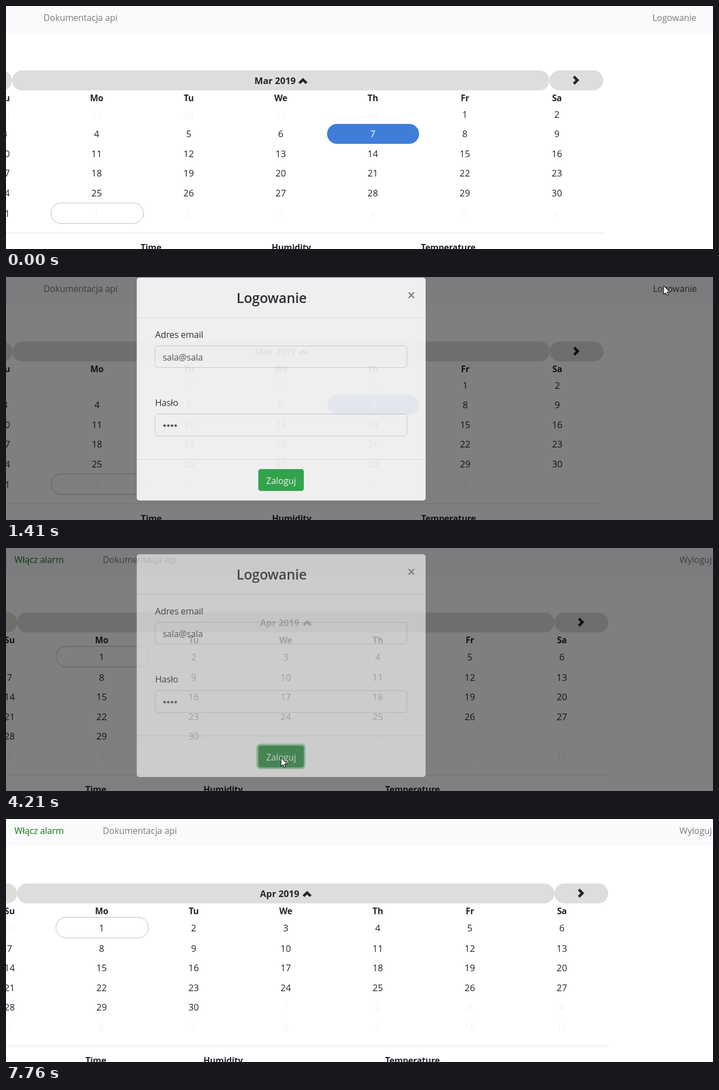
An HTML page that plays this animation: 1275 by 439 pixels, repeating every 8370 ms.

```html
<!DOCTYPE html>
<html lang="pl">
<head>
<meta charset="utf-8">
<title>Kalendarz</title>
<style>
  html, body { margin: 0; width: 100%; height: 100%; overflow: hidden; background: #fff; }
  svg { display: block; }
  text { font: 16px "Open Sans", "Noto Sans", sans-serif; letter-spacing: -.1px; fill: #212529; }
  .mid { text-anchor: middle; }
  .end { text-anchor: end; }
  .day { font-size: 16.5px; letter-spacing: 0; }
  .off { fill: #f4f4f4; }
  .head { font-weight: 700; font-size: 15.6px; letter-spacing: -.2px; }
  .month { font-weight: 700; font-size: 16.4px; letter-spacing: 0; }
  .link { fill: #000; fill-opacity: .5; }
  .title { font-weight: 600; font-size: 24.6px; }
  .value { fill: #495057; }
  .white { fill: #fff; }
  .pill { fill: #dddddc; }
  .icon { fill: none; stroke: #212529; stroke-width: 4.6; }
  .field { fill: #fff; stroke: #ced4da; }
  .rule { stroke: #dee2e6; }
</style>
</head>
<body>
<svg id="stage" width="1275" height="439" viewBox="0 0 1275 439"></svg>
<script>
const LOOP = 8370;
const LOGIN = 4130;
const PITCH = 166;

const label = (x, y, str, cls = '', id = '') =>
  `<text x="${x}" y="${y}" class="${cls}" id="${id}">${str}</text>`;
const box = (x, y, w, h, r, attrs) =>
  `<rect x="${x}" y="${y}" width="${w}" height="${h}" rx="${r}" ${attrs}/>`;

const march = {
  id: 'march', shift: 0, name: 'Mar 2019', nameX: 448, iconX: 535.5,
  rows: [196, 231, 267, 302, 338, 375],
  first: -4, before: 28, length: 31, today: [1, 5], selected: [4, 1],
  columns: [261.5, 514.5, 797.5]
};
const april = {
  id: 'april', shift: 9, name: 'Apr 2019', nameX: 458, iconX: 543,
  rows: [197, 234, 269, 305, 340, 376],
  first: 0, before: 31, length: 30, today: [1, 0],
  columns: [162, 391.5, 733]
};

function calendar(m) {
  const left = m.shift;
  const colX = c => left - 2.5 + c * PITCH;
  let out = box(left - 86, 116.5, 97, 36, 18, 'class="pill"')
    + box(left + 11, 116.5, 969, 36, 18, `class="pill" id="${m.id}Bar"`)
    + box(left + 980, 116.5, 97, 36, 18, 'class="pill"')
    + label(m.nameX, 140.5, m.name, 'month')
    + `<path class="icon" d="M${m.iconX - 6.5} 139.4l6.5-6.2l6.5 6.2"/>`
    + `<path class="icon" d="M${left + 1024} 127.5l6.5 6.5l-6.5 6.5"/>`
    + box(0, 0, PITCH, 36, 18, `fill="#f4f4f4" id="${m.id}Hover" visibility="hidden"`);
  const [tc, tr] = m.today;
  out += box(colX(tc) - 82.5, m.rows[tr] - 19.2, 167, 37, 18.5, 'fill="none" stroke="#bbb"');
  if (m.selected) {
    const [sc, sr] = m.selected;
    out += box(colX(sc) - 82.5, m.rows[sr] - 18, PITCH, 36, 18, 'fill="#3f7dd9"');
  }
  ['Su', 'Mo', 'Tu', 'We', 'Th', 'Fr', 'Sa'].forEach((d, c) => {
    out += label(colX(c), 172, d, 'head mid');
  });
  for (let i = 0; i < 42; i++) {
    const c = i % 7, r = Math.floor(i / 7), day = i + m.first;
    const inside = day > 0 && day <= m.length;
    const number = day < 1 ? day + m.before : inside ? day : day - m.length;
    const picked = m.selected && m.selected[0] === c && m.selected[1] === r;
    out += label(colX(c), m.rows[r] + 6, number, 'day mid ' + (picked ? 'white' : inside ? '' : 'off'));
  }
  out += box(0, 409.3, left + 1076.5, 1.3, 0, 'fill="#000" fill-opacity=".1"');
  ['Time', 'Humidity', 'Temperature'].forEach((h, i) => {
    out += label(m.columns[i], 442, h, 'head mid');
  });
  return out;
}

const modal = box(235.5, 21, 521.5, 403, 5, 'fill="#fff" stroke="#000" stroke-opacity=".2"')
  + label(479, 66.5, 'Logowanie', 'title mid')
  + '<path d="M726 48l10 10m0-10l-10 10" stroke="#808080" stroke-width="2.4"/>'
  + '<path class="rule" d="M236 93.5H757M236 349.5H757"/>'
  + label(269, 130, 'Adres email')
  + box(269, 144.5, 454, 39, 4.5, 'class="field"')
  + label(282.5, 171, 'sala@sala', 'value')
  + label(269, 253, 'Hasło')
  + box(269, 267.5, 454, 39.5, 4.5, 'class="field"')
  + [286, 292.7, 299.4, 306].map(x => `<circle cx="${x}" cy="288.5" r="2.3" fill="#495057"/>`).join('')
  + box(451.5, 363.5, 88.5, 46, 7, 'fill="#28a745" fill-opacity=".5" id="ring"')
  + box(455, 367, 82, 39.5, 4.5, 'id="button"')
  + label(496, 394, 'Zaloguj', 'white mid');

const bar = box(0, 0, 1275, 49.5, 0, 'fill="#f8fafc"');
document.getElementById('stage').innerHTML = `
  <g id="guest">${bar}
    ${label(67.5, 27, 'Dokumentacja api', 'link')}
    ${label(1245, 27, 'Logowanie', 'link end', 'loginLink')}
    <g id="marchBody">${calendar(march)}</g>
  </g>
  <g id="member">${bar}
    ${label(15, 27, 'Włącz alarm', '" style="fill:#1a751a')}
    ${label(174.5, 27, 'Dokumentacja api', 'link')}
    ${label(1273, 27, 'Wyloguj', 'link end')}
    ${calendar(april)}
  </g>
  <rect id="backdrop" width="1275" height="439"/>
  <g id="modal">${modal}</g>
  <g id="cursor" fill="#fff" stroke="#000" stroke-linejoin="round">
    <path id="arrow" d="M0 0V15.5L3.6 12.2L6 17.6L8.4 16.5L6 11.3H11Z"/>
    <path id="hand" d="M-1.6 11V1.6a1.6 1.6 0 0 1 3.2 0V7a1.5 1.4 0 0 1 2.9 .4a1.4 1.4 0 0 1 2.7 .6a1.3 1.3 0 0 1 2.3 .7V13q0 2-1.3 4V19.5H0V18L-4.6 12.5q-1.2-1.7 .2-2.4q1.2-.5 2.8 1.9z"/>
  </g>`;

// Cursor moves: start, end, number of steps, evenly timed points.
const moves = [
  [70, 450, 6, [1160, 410, 1172, 215, 1184, 85, 1188, 24, 1189, 8, 1190, 12.5]],
  [1410, 1800, 6, [1186, 16, 1180, 21, 1150, 40, 1070, 75, 950, 110, 821, 133]],
  [1880, 2650, 11, [740, 180, 650, 255, 580, 325, 530, 375, 509, 388]],
  [2880, 2960, 2, [514, 387, 520, 385]],
  [3590, 3660, 2, [518, 385, 517, 386]],
  [3830, 3980, 3, [508, 383, 500, 380, 496, 379]],
  [4540, 5370, 12, [475, 368, 410, 345, 335, 290, 250, 220, 180, 180, 135, 150,
    112, 142, 102, 135, 99, 133, 96, 114, 92, 95, 88, 76]],
  [5450, 6220, 11, [92, 62, 98, 30, 96, 16, 60, 34, 25, 36, 1, 42]],
  [6300, 7070, 11, [30, 36, 80, 34, 40, 40, 1, 44, 40, 46, 82, 48]],
  [7530, 7680, 3, [130, 75, 620, 230, 1100, 418]]
];
const shade = [[0, 0], [1180, .15], [1260, .4], [1330, .5], [4220, .3], [4300, 0]];
// Dialog: time, opacity, vertical offset.
const dialog = [[0, 0, -50], [1330, .38, -40], [1410, .88, -20], [1490, 1, -7],
  [1560, 1, -1.5], [1640, 1, 0], [LOGIN, .6, -10], [4220, 0, -40]];

const latest = (table, t) => table.filter(row => row[0] <= t).pop();

function cursorAt(t) {
  const move = latest(moves, t);
  if (!move || t >= 7760) return null;
  const [start, end, steps, pts] = move;
  const step = Math.min(steps - 1, Math.floor((t - start) / (end - start) * (steps - 1) + .2));
  const last = pts.length / 2 - 1;
  const pos = step / (steps - 1) * last;
  const i = Math.min(last - 1, Math.floor(pos)), f = pos - i;
  const mix = k => pts[2 * i + k] + (pts[2 * i + 2 + k] - pts[2 * i + k]) * f;
  return [mix(0), mix(1)];
}

const el = id => document.getElementById(id);
const show = (id, on) => el(id).setAttribute('visibility', on ? 'visible' : 'hidden');

function render(t) {
  const at = cursorAt(t);
  const [x, y] = at || [-99, -99];
  const member = t >= LOGIN;
  const opened = t >= 1180 && !member;
  const overLink = t < 1490 && at && y < 40;
  const overButton = opened && x > 455 && x < 537 && y > 367 && y < 407;
  const overBar = member && x > 20 && x < 988 && y > 116 && y < 153;
  const overAlarm = member && x > 8 && x < 112 && y > 0 && y < 34;
  const row = member && t >= 4540 ? april.rows.slice(0, 5).findIndex(r => Math.abs(y - r) < 18) : -1;
  const col = Math.floor((x - 6.5) / PITCH + .5);
  const overDay = row >= 0 && col < 7;

  el('guest').style.display = member ? 'none' : '';
  el('member').style.display = member ? '' : 'none';
  el('marchBody').setAttribute('transform', `translate(${opened ? .6 : 0})`);
  el('loginLink').setAttribute('transform', `translate(${opened ? 1 : 0})`);
  el('loginLink').style.fillOpacity = overLink ? .7 : .5;
  el('aprilBar').style.fill = overBar ? '#f4f4f4' : '';
  show('aprilHover', overDay);
  if (overDay) {
    el('aprilHover').setAttribute('x', 6.5 + col * PITCH - 83);
    el('aprilHover').setAttribute('y', april.rows[row] - 18);
  }

  el('backdrop').setAttribute('opacity', latest(shade, t)[1]);
  const [, alpha, dy] = latest(dialog, t);
  el('modal').setAttribute('opacity', alpha);
  el('modal').setAttribute('transform', `translate(0 ${dy})`);
  el('ring').setAttribute('opacity', t >= 2570 ? 1 : 0);
  el('button').setAttribute('fill', overButton || member ? '#218838' : '#28a745');

  const hand = (overLink && t < 1410) || overButton || overBar || overAlarm || overDay;
  el('cursor').setAttribute('transform', `translate(${x} ${y})`);
  show('arrow', at && !hand);
  show('hand', at && hand);
}

const start = performance.now();
function tick() {
  render((performance.now() - start) % LOOP);
  requestAnimationFrame(tick);
}
tick();
</script>
</body>
</html>
```
